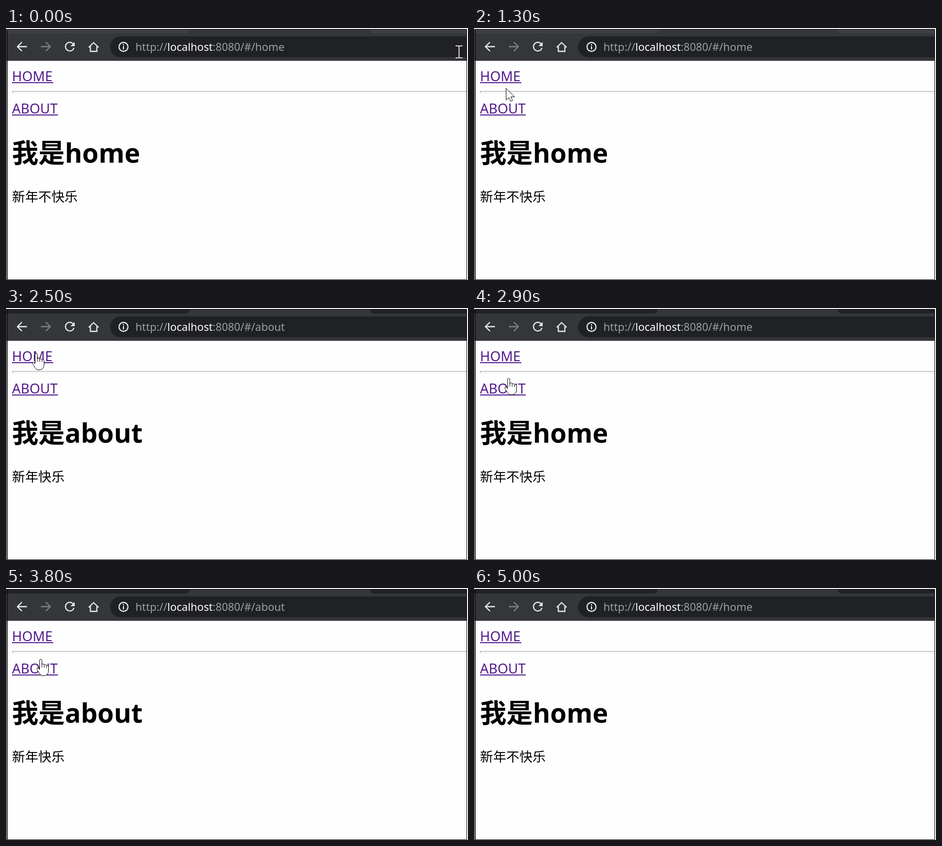
Recreate the animation shown at these times as an HTML page. Size 928 by 507 pixels, loop 5100 ms.

```html
<!DOCTYPE html>
<html lang="zh-CN">
<head>
<meta charset="utf-8">
<title>Router demo</title>
<style>
  html, body { margin: 0; width: 100%; height: 100%; overflow: hidden; background: #fff; }
  svg { position: absolute; left: 0; top: 0; display: block; }
  text { font-family: "Noto Sans", "Noto Sans CJK SC", "Noto Sans CJK", sans-serif; white-space: pre; }
  .url { font-size: 21.6px; fill: #9aa0a6; }
  .host { fill: #fff; }
  .link { font-size: 27.3px; fill: #551a8b; }
  .title { font-size: 53.1px; font-weight: 700; }
  .note { font-size: 26.4px; }
  .icon { fill: none; stroke: #e8eaed; stroke-width: 2.3; }
  .pointer { fill: #fff; stroke: #000; stroke-linejoin: round; }
</style>
</head>
<body>
<svg width="928" height="507" viewBox="0 0 928 507">
  <rect width="928" height="507" fill="#fff"/>
  <rect x="2" y="66" width="923" height="440" fill="#fefefe"/>

  <rect y="2" width="925" height="64" fill="#35363a"/>
  <path id="tabs" d="M0 2H369V3Q368 11 360 11H0ZM731 2H925V11H740Q732 11 731 3Z"/>
  <path d="M925 17H230a21 21 0 0 0 0 42H925Z" fill="#202124"/>

  <g class="icon">
    <path d="M42 37.5H24M32 28.5L23 37.5L32 46.5"/>
    <path d="M70 37.5H88M80 28.5L89 37.5L80 46.5" stroke="#7f8184"/>
    <path d="M134.5 31.5A8.7 8.7 0 1 0 136.5 40"/>
    <path d="M138 28V36.5H129.5Z" fill="#e8eaed" stroke="none"/>
    <path d="M166 39L176 29.5L186 39M169.5 37V47H182.5V37"/>
    <circle cx="236" cy="38" r="9"/>
    <path d="M236 36.5V43M236 32.5V35"/>
  </g>
  <text class="url" x="260" y="46">http://<tspan class="host">localhost</tspan>:8080/#/<tspan id="route">home</tspan></text>

  <text class="link" x="12" y="107">HOME</text>
  <rect x="12" y="109" width="83" height="2" fill="#551a8b"/>
  <path d="M12 127H925V128H13V131H12Z" fill="#9a9a9a"/>
  <rect x="13" y="130" width="912" height="1" fill="#ededed"/>
  <text class="link" x="12" y="172">ABOUT</text>
  <rect x="12" y="174" width="92" height="2" fill="#551a8b"/>

  <text class="title" x="12" y="271">我是<tspan id="name">home</tspan></text>
  <text class="note" id="note" x="12" y="349">新年不快乐</text>

  <path d="M2.5 2.5H925.5V506.5H2.5Z" fill="none" stroke="#000"/>
  <rect x="1" y="66" width="2" height="441"/>

  <g id="cursor">
    <path id="ibeam" d="M-7 -12H-2Q0 -12 0 -10Q0 -12 2 -12H7M0 -10V10M-7 12H-2Q0 12 0 10Q0 12 2 12H7" fill="none" stroke="#d8d8d8" stroke-width="2"/>
    <path id="arrow" class="pointer" d="M.5 .5V24L6 19L9.5 26.5L13.5 24.8L10.2 17.5H17.5Z"/>
    <g id="hand" class="pointer">
      <path d="M-2.5 2.5Q-2.5 .5 -.3 .5Q2 .5 2 2.5V11Q2.5 9.5 4.5 9.7Q6.5 10 6.7 12Q7.5 10.5 9.3 11Q11 11.5 11.3 13.3Q12.5 12.3 14 13Q15.5 13.8 15.5 16V23Q15.5 28 12.5 31Q10.5 33.5 6 33.5H4Q0 33.5 -2.5 29.5L-7.5 21.5Q-8.5 19 -6.8 18Q-5 17.3 -2.5 21Z"/>
      <path d="M2 10V17M6.7 12V17.5M11.3 13.3V18" fill="none"/>
    </g>
  </g>
</svg>
<script>
const LOOP = 5100, STEP = 100;
const FOCUS_AT = 1500;                 // window becomes active
const FIRST_CLICK = 2070, BEAT = 432;  // clicks alternate ABOUT, HOME
const CLICKS = 6;
const SWAY_FROM = 1800, EXIT_AT = 4800, GONE_AT = 5000;

const el = id => document.getElementById(id);

// Sweep in from the address bar: time, x, y
const entry = [
  [0, 910, 48], [100, 692, 129], [200, 605, 192], [500, 594, 199],
  [600, 452, 243], [700, 367, 190], [800, 243, 111], [1000, 62, 116],
  [SWAY_FROM, 66, 129]
];

function along(points, time) {
  const i = Math.max(1, points.findIndex(p => p[0] >= time));
  const [t0, x0, y0] = points[i - 1], [t1, x1, y1] = points[i];
  const k = (time - t0) / (t1 - t0);
  return [x0 + (x1 - x0) * k, y0 + (y1 - y0) * k];
}

// Swing between the links, one end per click
function sway(time) {
  const c = Math.cos(Math.PI * (time - FIRST_CLICK) / BEAT);
  const swing = c * Math.abs(c);
  return [65.5 + 4.5 * swing, 117 + 26 * swing];
}

function pointerAt(time) {
  if (time <= SWAY_FROM) return along(entry, time);
  if (time < EXIT_AT) return sway(time);
  return time === EXIT_AT ? [138, 108] : [905, 82];
}

const overLink = (x, y) => x >= 12 && x <= 104 && (y < 112 || y > 140) && y > 78 && y < 178;

function setText(id, value) {
  if (el(id).textContent !== value) el(id).textContent = value;
}

function draw() {
  const time = Math.floor(performance.now() % LOOP / STEP) * STEP;
  const clicks = Math.floor((time - FIRST_CLICK) / BEAT) + 1;
  const about = clicks > 0 && clicks < CLICKS && clicks % 2 === 1;
  const route = about ? "about" : "home";

  setText("route", route);
  setText("name", route);
  setText("note", about ? "新年快乐" : "新年不快乐");
  el("tabs").setAttribute("fill", time < FOCUS_AT ? "#3c4043" : "#202124");

  const [x, y] = pointerAt(time).map(Math.round);
  const kind = time === 0 ? "ibeam" : overLink(x, y) ? "hand" : "arrow";
  for (const id of ["ibeam", "hand", "arrow"]) {
    el(id).setAttribute("visibility", time < GONE_AT && id === kind ? "visible" : "hidden");
  }
  el("cursor").setAttribute("transform", `translate(${x} ${y})`);
  requestAnimationFrame(draw);
}
draw();
</script>
</body>
</html>
```
